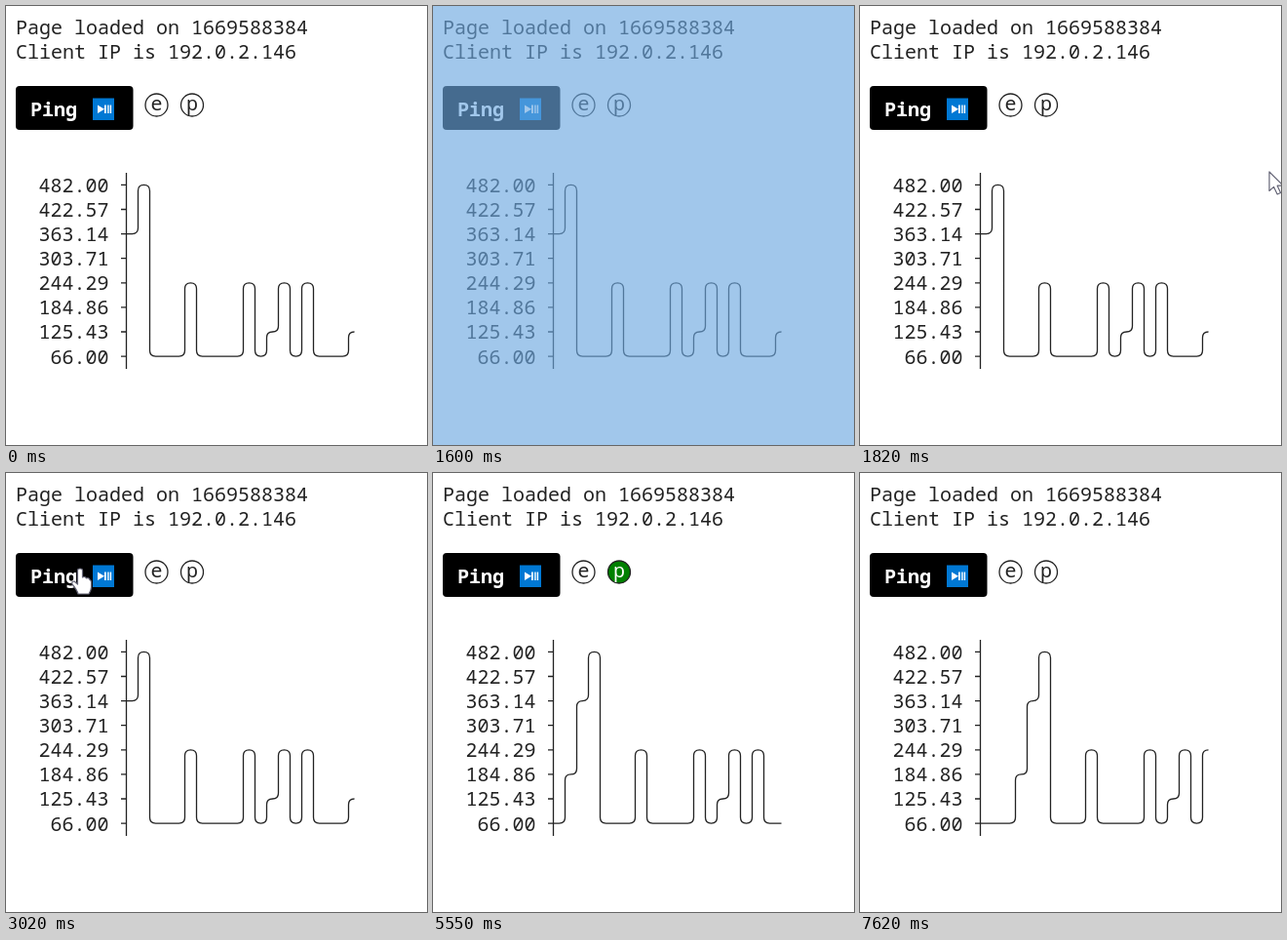
Recreate the animation shown at these times as an HTML page. Size 432 px wide and 450 px high, loop 8000 ms.

```html
<!DOCTYPE html>
<html lang="en">
<head>
<meta charset="utf-8">
<style>
  html, body { margin: 0; width: 100%; height: 100%; overflow: hidden; background: #fff; }
  svg { display: block; }
  text { font: 20px "Noto Sans Mono", "DejaVu Sans Mono", monospace; fill: #222; white-space: pre; }
  .line { fill: none; stroke: #222; stroke-width: 1.3; }
  .cursor { fill: #fff; stroke: #667; stroke-width: 1.2; stroke-linejoin: round; }
</style>
</head>
<body>
<svg width="432" height="450" viewBox="0 0 432 450">
  <text x="10" y="29">Page loaded on 1669588384</text>
  <text x="10" y="54">Client IP is 192.0.2.146</text>

  <rect x="10" y="82" width="120.5" height="45" rx="4"/>
  <text x="25" y="113" style="font-weight:700;fill:#fff">Ping</text>
  <rect x="89" y="94.5" width="22" height="22.5" fill="#0078d4"/>
  <path d="M94 101.5l7 4.2-7 4.2zM101 101.5h1.8v8.4H101zM104.2 101.5h1.4v8.4h-1.4zM106.7 101.5h1.4v8.4h-1.4z" fill="#fff"/>

  <circle class="line" cx="154.5" cy="101.5" r="11.5"/>
  <text x="148.5" y="107">e</text>
  <circle id="lamp" class="line" cx="191" cy="101.5" r="11.5"/>
  <text id="lampText" x="185" y="107">p</text>

  <g id="labels"></g>
  <path id="axis" class="line"/>
  <path id="plot" class="line"/>
  <text id="status" x="10" y="435">Pinging…</text>

  <path id="arrow" class="cursor" d="M0 0V19.5L4.6 15.4 8.2 23 11.6 21.5 8.2 14.2H14.3Z"/>
  <path id="hand" class="cursor" d="M-2.5 16V2Q-2.5 0 0 0T2.5 2V9Q5 7.5 6.5 10 9 9 10 11.5 11.5 12 11.5 14V19Q11.5 22 9 26H-2Q-3 22-8 16-9 13-6 13Z"/>
  <rect id="flash" width="432" height="450" fill="rgba(109,168,224,.64)"/>
</svg>
<script>
const LOOP = 8000, ROW = 25.1, COL = 12, TOP = 183.4, AXIS = 123.5;
const el = id => document.getElementById(id);
const show = (id, on) => el(id).style.display = on ? '' : 'none';
const within = (t, from, to) => t >= from && t < to;
const rowY = level => TOP + (7 - level) * ROW;

// Newest reading first; the last 20 entries are the initial series.
const readings = [0, 0, 0, 2, 5, 7, 0, 0, 0, 3, 0, 0, 0, 0, 3, 0, 1, 3, 0, 3, 0, 0, 0, 1];
const updates = [4650, 5550, 6480, 7530];
const blinks = [[4410, 4480], [4650, 4720], [5550, 5640], [6480, 6630], [7530, 7620]];

// Cursor stops: [time, x, y]
const stops = [[1750, 428, 172], [1820, 420, 170], [1910, 385, 165], [1980, 335, 157], [2060, 300, 153]];
for (let i = 1; i <= 9; i++) {
  const p = 1 - (1 - i / 9) ** 2;
  stops.push([2390 + (i - 1) * 78.75, 300 - 224 * p, 153 - 55 * p]);
}
stops.push([3920, 80, 98], [3990, 84, 99]);

let ticks = `M${AXIS} 171V372`;
for (let level = 0; level < 8; level++) {
  const y = rowY(level);
  const value = (66 + level * 416 / 7).toFixed(2).padStart(6);
  el('labels').innerHTML += `<text x="33.5" y="${y + 7.4}">${value}</text>`;
  ticks += `M118 ${y}H${AXIS}`;
}
el('axis').setAttribute('d', ticks);

function plotPath(values) {
  const r = COL / 2;
  let d = `M${AXIS} ${rowY(values[0])}`;
  for (let k = 0; k < 19; k++) {
    const x = AXIS + (k + 1) * COL, y0 = rowY(values[k]), y1 = rowY(values[k + 1]);
    if (y0 === y1) {
      d += `H${x + r}`;
      continue;
    }
    const s = Math.sign(y1 - y0) * r;
    d += `H${x - r}Q${x} ${y0} ${x} ${y0 + s}V${y1 - s}Q${x} ${y1} ${x + r} ${y1}`;
  }
  return d;
}

function draw(t) {
  const first = 4 - updates.filter(u => t >= u).length;
  el('plot').setAttribute('d', plotPath(readings.slice(first, first + 20)));

  const lit = blinks.some(([from, to]) => within(t, from, to));
  el('lamp').style.fill = lit ? '#008000' : 'none';
  el('lampText').style.fill = lit ? '#fff' : '#222';

  show('flash', within(t, 1600, 1670));
  show('status', within(t, 3430, 4650));

  const stop = stops.filter(s => t >= s[0]).pop();
  const visible = stop && t < 4410;
  const overButton = visible && stop[1] < 130;
  show('arrow', visible && !overButton);
  show('hand', overButton);
  if (visible) {
    el(overButton ? 'hand' : 'arrow').setAttribute('transform', `translate(${stop[1]} ${stop[2]})`);
  }
}

const start = performance.now();
function tick() {
  draw((performance.now() - start) % LOOP);
  requestAnimationFrame(tick);
}
tick();
</script>
</body>
</html>
```
